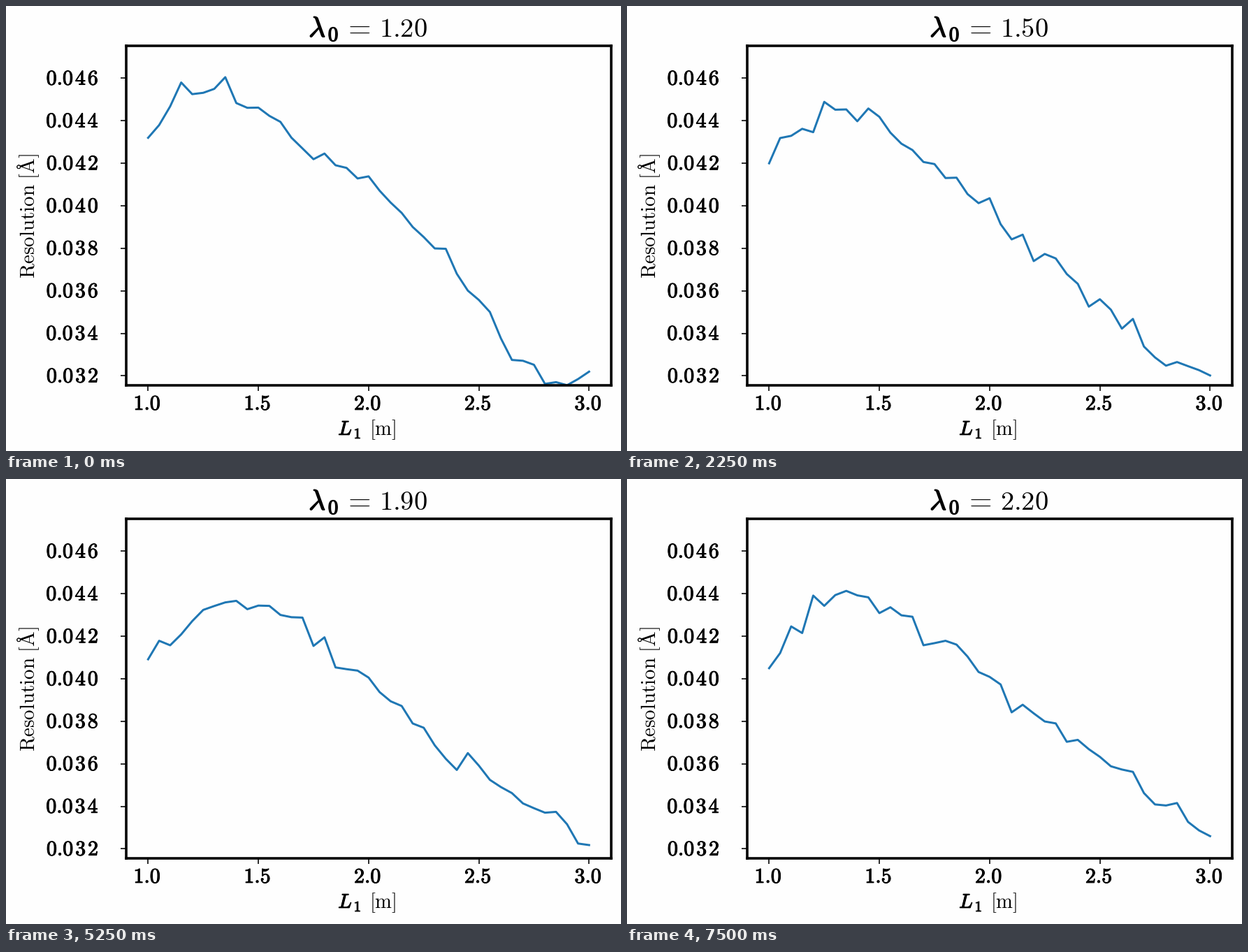
Recreate the animation shown at these times as a matplotlib script. Size 880 by 637 pixels, loop 8000 ms.

```python
import matplotlib.pyplot as plt
import numpy as np
from matplotlib.animation import FuncAnimation
from matplotlib.patheffects import withStroke

W, H, DPI = 880, 637, 100
PT = 72 / DPI  # points per pixel
BG = "#fefefe"
plt.rcParams["mathtext.fontset"] = "cm"

STEPS = 11
L1 = np.linspace(1, 3, 41)
# Smooth resolution profile (1e-3 angstrom) at the first, middle and last step
KEY_L1 = [1.0, 1.2, 1.6, 2.0, 2.5, 3.0]
FIRST = np.array([43.2, 45.7, 43.8, 40.9, 35.5, 32.2])
MIDDLE = np.array([41.2, 43.4, 42.7, 39.1, 35.4, 31.9])
LAST = np.array([40.5, 43.2, 43.2, 40.3, 36.2, 32.6])


def curve(step):
    """Profile for one wavelength plus seeded noise that fades to the right."""
    s = 2 * step / (STEPS - 1)
    keys = FIRST + (MIDDLE - FIRST) * min(s, 1) + (LAST - MIDDLE) * max(s - 1, 0)
    smooth = np.polyval(np.polyfit(KEY_L1, keys, len(keys) - 1), L1)
    noise = np.random.default_rng(40 + step).normal(0, 1, L1.size)
    noise[[0, -1]] = 0
    return (smooth + noise * np.linspace(0.45, 0.25, L1.size)) / 1000


CURVES = [curve(s) for s in range(STEPS)]

fig = plt.figure(figsize=(W / DPI, H / DPI), dpi=DPI, facecolor=BG)


def label(x, y, tex, size, bold=0, ha="center", **kw):
    """Math text with its baseline at pixel (x, y), optionally thickened."""
    t = fig.text(x / W, 1 - y / H, f"${tex}$", fontsize=size * PT, ha=ha,
                 va="baseline", color="black", **kw)
    if bold:
        t.set_path_effects([withStroke(linewidth=bold * PT, foreground="black")])
    return t


def bold_number(text):
    whole, frac = text.split(".")
    return r"\mathbf{%s.%s}" % (whole, r"\hspace{0.11}".join(frac))


LEFT, RIGHT, TOP, BOTTOM = 171.8, 865.9, 57.4, 543
ax = fig.add_axes([LEFT / W, 1 - BOTTOM / H, (RIGHT - LEFT) / W, (BOTTOM - TOP) / H],
                  facecolor=BG)
ax.set_xlim(0.9, 3.1)
ax.set_ylim(0.031556, 0.047514)
ax.set_xticks(np.arange(1, 3.1, 0.5))
ax.set_yticks(np.arange(32, 47, 2) / 1000)
ax.tick_params(length=7.8 * PT, width=1.6 * PT, labelleft=False, labelbottom=False)
for spine in ax.spines.values():
    spine.set_linewidth(3.6 * PT)

for i in range(5):
    label(202 + 157.75 * i, 578, bold_number(f"{1 + i / 2:.1f}"), 30, 1)
for i in range(8):
    label(132.5, 538.7 - 60.86 * i, bold_number(f"{0.032 + 0.002 * i:.3f}"),
          30, 1, ha="right")

upright = dict(rotation=90, rotation_mode="anchor")
label(41, 301, r"\mathrm{Resolution\ [A]}", 29, **upright)
label(21.8, 229.7, r"\circ", 14, 0.5, **upright)  # ring of the angstrom sign
label(485.5, 614, "L", 28.7, 1.1)
label(503, 619, r"\mathbf{1}", 21, 1)
label(539.5, 614, r"\mathrm{[m]}", 28.7)

label(445.5, 44, r"\lambda", 41, 1.5)
label(468.5, 50, r"\mathbf{0}", 29, 1.4)
label(501.5, 44, "=", 42)
value = label(568.5, 44, "1.20", 38.5)

line, = ax.plot(L1, CURVES[0], color="#1f77b4", lw=3 * PT)


def update(frame):
    step = frame // 3
    line.set_ydata(CURVES[step])
    value.set_text(f"${1.2 + step / 10:.2f}$")
    return line, value


anim = FuncAnimation(fig, update, frames=32, interval=250, repeat=True, repeat_delay=0)
plt.show()
```
